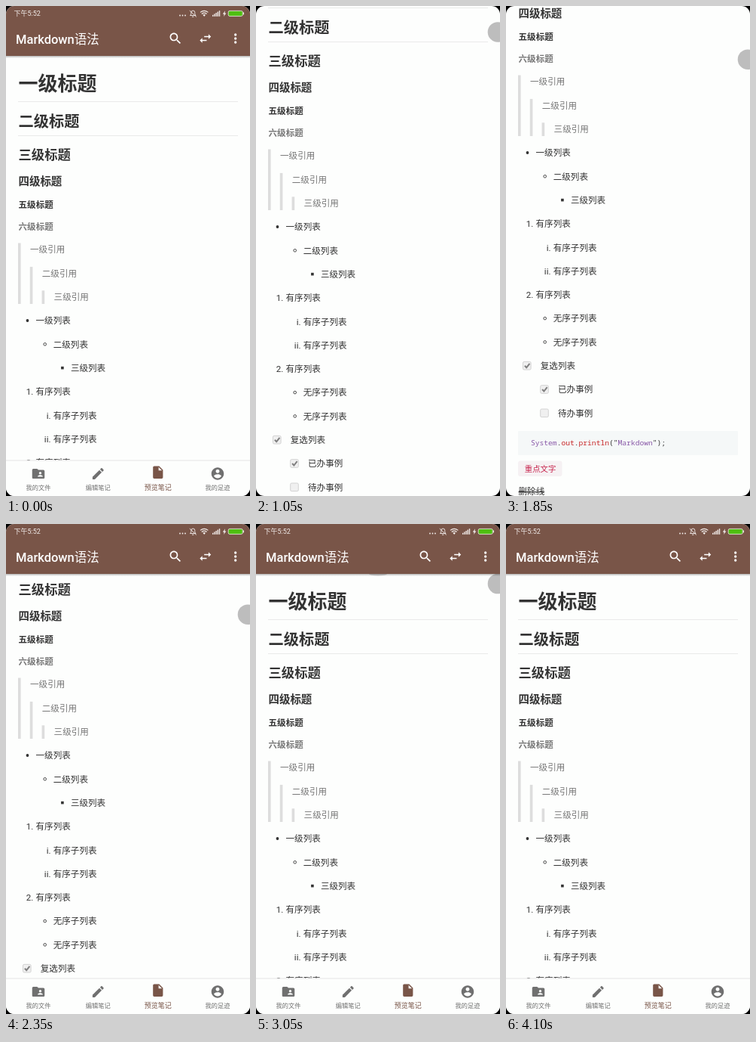
Animation of 324x648 px, one loop 4350 ms. Source, as an HTML page:

```html
<!DOCTYPE html>
<html lang="zh-CN">
<head>
<meta charset="utf-8">
<title>Markdown语法</title>
<style>
  html, body { margin: 0; width: 100%; height: 100%; overflow: hidden; background: #000; }
  svg { display: block; width: 324px; height: 648px; border-radius: 11px; background: #fdfefd; }
  text { font-family: Roboto, "Noto Sans CJK SC", "Noto Sans CJK", sans-serif; white-space: pre; }
  .code { font-family: "Noto Sans Mono", "DejaVu Sans Mono", monospace; }
</style>
</head>
<body>
<svg id="stage" viewBox="0 0 324 648">
  <defs>
    <linearGradient id="shade" x1="0" y1="0" x2="0" y2="1">
      <stop offset="0" stop-color="#000" stop-opacity=".28"/>
      <stop offset="1" stop-color="#000" stop-opacity="0"/>
    </linearGradient>
  </defs>
  <g id="page"></g>
  <ellipse id="glow" cx="162" cy="66" rx="12" ry="2.6" fill="#d4d4d4"/>
  <circle id="thumb" cx="321" r="13.3" fill="#bdbdbd"/>
  <g id="bar"></g>
  <g id="nav"></g>
  <g id="status"></g>
</svg>
<script>
const LOOP = 4350, STEP = 50, BAR = 66, BROWN = "#795548", INK = "#333", GREY = "#777";
const $ = id => document.getElementById(id);

function add(parent, tag, attrs, content) {
  const el = document.createElementNS("http://www.w3.org/2000/svg", tag);
  for (const k in attrs) el.setAttribute(k, attrs[k]);
  if (content) el.textContent = content;
  parent.appendChild(el);
  return el;
}

// Places text by the vertical centre of its CJK glyph box.
const label = (parent, str, x, cy, size, fill, more) =>
  add(parent, "text", { x, y: cy + size * 0.38, "font-size": size, fill, ...more }, str);

const rect = (parent, x, y, width, height, fill, more) =>
  add(parent, "rect", { x, y, width, height, fill, ...more });

const dot = (parent, cx, cy, r, fill, more) =>
  add(parent, "circle", { cx, cy, r, fill, ...more });

const line = (parent, d, stroke, width) =>
  add(parent, "path", { d, fill: "none", stroke, "stroke-width": width });

const icon = (parent, d, cx, cy, fill) =>
  add(parent, "path", { d, fill, transform: `translate(${cx} ${cy}) scale(.825) translate(-12 -12)` });

function drawPage() {
  const g = $("page"), base = 11.57, pitch = 31.4;
  const bold = { "font-weight": 700 };
  [["一级标题", 102, 2.25], ["二级标题", 152, 1.75], ["三级标题", 196, 1.5],
   ["四级标题", 231.5, 1.25], ["五级标题", 262.3, 1], ["六级标题", 291.3, 1]]
    .forEach(([s, y, em], i) => label(g, s, 16.5, y, base * em, i == 5 ? GREY : INK, bold));
  rect(g, 16, 126, 292, 1, "#eaeaea");
  rect(g, 16, 171, 292, 1, "#eaeaea");

  ["一级引用", "二级引用", "三级引用"].forEach((s, i) => {
    const top = 313.5 + pitch * i;
    rect(g, 16 + 15.8 * i, top, 3.6, 394 - top, "#ddd");
    label(g, s, 32 + 15.8 * i, 322 + pitch * i, base, GREY);
  });

  // Depth, marker, text
  const rows = [
    [0, "disc", "一级列表"], [1, "ring", "二级列表"], [2, "square", "三级列表"],
    [0, "1.", "有序列表"], [1, "i.", "有序子列表"], [1, "ii.", "有序子列表"],
    [0, "2.", "有序列表"], [1, "ring", "无序子列表"], [1, "ring", "无序子列表"],
    [0, "on", "复选列表"], [1, "on", "已办事例"], [1, "off", "待办事例"]
  ];
  rows.forEach(([depth, mark, str], i) => {
    const x = 39.5 + 23.2 * depth, y = 416 + 31.3 * i, mx = x - 11;
    const check = mark == "on" || mark == "off";
    label(g, str, check ? x + 6.3 : x, y, base, INK);
    if (mark == "disc") dot(g, mx, y, 1.9, INK);
    else if (mark == "ring") dot(g, mx, y, 1.8, "none", { stroke: INK, "stroke-width": 0.9 });
    else if (mark == "square") rect(g, mx - 1.8, y - 1.8, 3.6, 3.6, INK);
    else if (check) {
      rect(g, x - 17, y - 5.3, 10.6, 10.6, "#f0f0f0", { rx: 1.6, stroke: "#cfcfcf", "stroke-width": 0.9 });
      if (mark == "on") line(g, `M${x - 14.6} ${y}l2.3 2.5 4.2-5.4`, "#808080", 2);
    } else label(g, mark, x - 3.2, y, base, INK, { "text-anchor": "end" });
  });

  rect(g, 16, 784, 292, 32, "#f5f8f8", { rx: 1 });
  const code = add(g, "text", { x: 33, y: 803, "font-size": 9.65, class: "code" });
  [["System", "#8959a8"], [".", INK], ["out", "#c82829"], [".", INK], ["println", "#c82829"],
   ["(\"", INK], ["Markdown", "#8959a8"], ["\");", INK]]
    .forEach(([s, fill]) => add(code, "tspan", { fill }, s));

  rect(g, 16, 823.5, 58.5, 20.5, "#f6f1f3", { rx: 3 });
  label(g, "重点文字", 24.8, 833.6, 10.4, "#c7254e");
  label(g, "删除线", 16.5, 864, base, INK, { "text-decoration": "line-through" });
}

function drawBar() {
  const g = $("bar"), white = "#fff";
  rect(g, 0, BAR, 324, 3, "url(#shade)");
  rect(g, 0, 0, 324, BAR, BROWN);
  const title = add(g, "text", { x: 13, y: 49.5, "font-size": 16.5, fill: white });
  add(title, "tspan", { "font-weight": 500 }, "Markdown");
  add(title, "tspan", {}, "语法");
  icon(g, "M15.5 14h-.79l-.28-.27C15.41 12.59 16 11.11 16 9.5 16 5.91 13.09 3 9.5 3S3 5.91 3 9.5 5.91 16 9.5 16c1.61 0 3.09-.59 4.23-1.57l.27.28v.79l5 4.99L20.49 19l-4.99-5zm-6 0C7.01 14 5 11.99 5 9.5S7.01 5 9.5 5 14 7.01 14 9.5 11.99 14 9.5 14z", 225, 43, white);
  icon(g, "M6.99 11L3 15l3.99 4v-3H14v-2H6.99v-3zM21 9l-3.99-4v3H10v2h7.01v3L21 9z", 264.8, 43, white);
  for (const dy of [-5, 0, 5]) dot(g, 304.7, 43 + dy, 1.65, white);
}

function drawNav() {
  const g = $("nav");
  rect(g, 0, 601, 324, 48, "#fdfefd");
  rect(g, 0, 600.5, 324, 1, "#e6e6e6");
  [["我的文件", 43, "M20 6h-8l-2-2H4c-1.1 0-1.99.9-1.99 2L2 18c0 1.1.9 2 2 2h16c1.1 0 2-.9 2-2V8c0-1.1-.9-2-2-2zm-5 3c1.1 0 2 .9 2 2s-.9 2-2 2-2-.9-2-2 .9-2 2-2zm4 8h-8v-1c0-1.33 2.67-2 4-2s4 .67 4 2v1z"],
   ["编辑笔记", 122.3, "M3 17.25V21h3.75L17.81 9.94l-3.75-3.75L3 17.25zM20.71 7.04c.39-.39.39-1.02 0-1.41l-2.34-2.34c-.39-.39-1.02-.39-1.41 0l-1.83 1.83 3.75 3.75 1.83-1.83z"],
   ["预览笔记", 201.8, "M6 2c-1.1 0-1.99.9-1.99 2L4 20c0 1.1.89 2 1.99 2H18c1.1 0 2-.9 2-2V8l-6-6H6zm7 7V3.5L18.5 9H13z"],
   ["我的足迹", 281, "M12 2C6.48 2 2 6.48 2 12s4.48 10 10 10 10-4.48 10-10S17.52 2 12 2zm0 3c1.66 0 3 1.34 3 3s-1.34 3-3 3-3-1.34-3-3 1.34-3 3-3zm0 14.2c-2.5 0-4.71-1.28-6-3.22.03-1.99 4-3.08 6-3.08 1.99 0 5.97 1.09 6 3.08-1.29 1.94-3.5 3.22-6 3.22z"]]
    .forEach(([s, x, d], i) => {
      const active = i == 2, fill = active ? BROWN : "#707070";
      icon(g, d, x, active ? 616.7 : 618.5, fill);
      label(g, s, x, active ? 636.2 : 637, active ? 9.05 : 8.25, fill, { "text-anchor": "middle" });
    });
}

function drawStatus() {
  const g = $("status"), pale = "#f3eeec";
  label(g, "下午5:52", 10.5, 10, 9, pale);
  for (const x of [231, 234.5, 238]) dot(g, x, 12.5, 0.9, pale);
  line(g, "M244.5 12.5h7.5l-1.2-1.8V8.6a2.5 2.5 0 0 0-5 0v2.1zM247 14.2h2.4M243.8 6l9 8.4", pale, 0.9);
  line(g, "M258 8.4q5.2-4.2 10.4 0M259.8 10.5q3.4-2.7 6.8 0", pale, 1.2);
  add(g, "path", { d: "M261.3 11.6q1.9-1.3 3.8 0l-1.9 2.4z", fill: pale });
  [2, 3.4, 4.8, 6.2, 7.6].forEach((h, i) => rect(g, 274 + 2.2 * i, 13.8 - h, 1.4, h, pale));
  add(g, "path", { d: "M291 6.3l-3.2 4.4h2l-.8 3.4 3.4-4.6h-2z", fill: pale });
  rect(g, 295.2, 6.4, 19, 7, "#4fbf12", { rx: 1.8, stroke: pale, "stroke-width": 0.8 });
  rect(g, 314.8, 8.4, 1.2, 3, pale);
}

const tracks = {
  bar: [[350, 0], [700, 60], [735, BAR], [1880, BAR], [2130, 0]],
  scroll: [[735, 0], [1050, 58], [1400, 115], [1600, 141], [1850, 156], [2130, 156], [2350, 110], [2850, 0]],
  hide: [[750, 0], [950, 1], [2000, 1], [2200, 0]],
  thumb: [[735, 0], [885, 1], [3900, 1], [4100, 0]],
  glow: [[2880, 0], [3050, 1], [3300, 0]]
};

function at(track, t) {
  const i = track.findIndex(p => p[0] > t);
  if (i < 0) return track[track.length - 1][1];
  if (i == 0) return track[0][1];
  const [t0, a] = track[i - 1], [t1, b] = track[i];
  return a + (b - a) * (t - t0) / (t1 - t0);
}

const shift = (id, x, y) => $(id).setAttribute("transform", `translate(${x} ${y})`);

function render(now) {
  const t = Math.floor((now % LOOP) / STEP) * STEP;
  const bar = at(tracks.bar, t), scroll = at(tracks.scroll, t), hide = at(tracks.hide, t);
  shift("page", 0, -bar - scroll);
  shift("bar", 0, bar < BAR ? -bar : -BAR - 4);
  shift("nav", 0, 49 * hide);
  shift("status", 0, -20 * hide);
  shift("thumb", 17 * (1 - at(tracks.thumb, t)), BAR - bar + 13 + 0.37 * scroll);
  $("glow").setAttribute("opacity", at(tracks.glow, t));
}

drawPage();
drawBar();
drawNav();
drawStatus();

const start = performance.now();
function tick() {
  render(performance.now() - start);
  requestAnimationFrame(tick);
}
tick();
</script>
</body>
</html>
```
